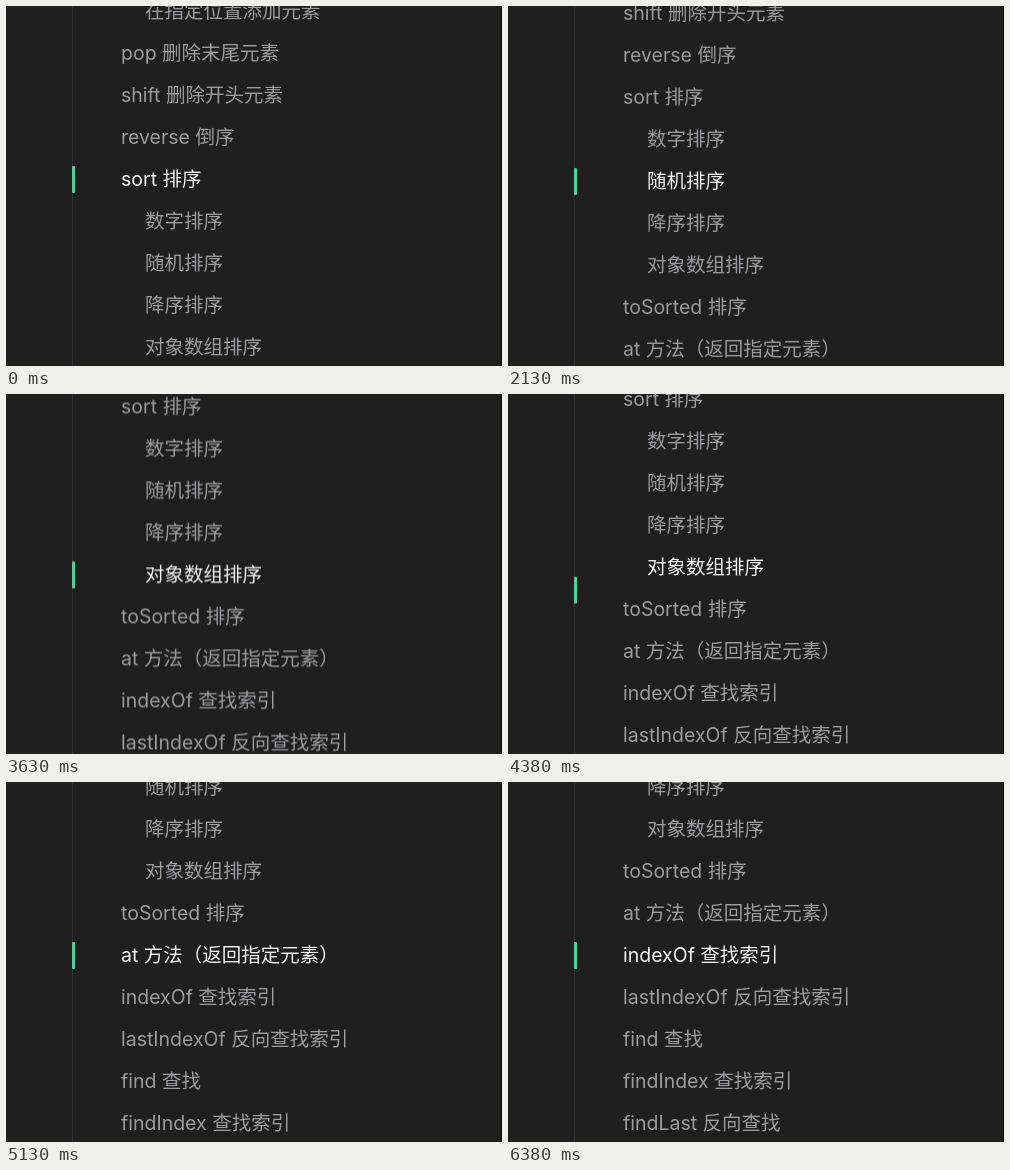
Recreate the animation shown at these times as an HTML page. Size 496 px wide and 360 px high, loop 8.04 s.

```html
<!DOCTYPE html>
<html lang="zh-CN">
<head>
<meta charset="utf-8">
<title>Outline</title>
<style>
  html, body { margin: 0; width: 100%; height: 100%; overflow: hidden; background: #1f1f20; }
  .stage { position: relative; width: 496px; height: 360px; overflow: hidden; }
  .rule, .edge { position: absolute; top: 0; width: 1px; height: 360px; }
  .rule { left: 66px; background: #303032; }
  .edge { left: 495px; background: #080808; }
  .list { position: absolute; left: 0; top: 0; width: 496px; animation: scroll 8040ms infinite; }
  .list a {
    position: absolute; left: 115px; height: 42px;
    font: 400 19.5px/42px Inter, "Noto Sans CJK SC", "Noto Sans CJK", sans-serif;
    font-optical-sizing: none; white-space: nowrap; color: rgb(156, 156, 158);
  }
  .list a.sub { left: 139px; }
  .marker {
    position: absolute; left: 66px; top: -8px; width: 3px; height: 27px;
    border-radius: 1px; background: #5fc99b; animation: marker 8040ms infinite;
  }
</style>
</head>
<body>
<div class="stage">
  <div class="rule"></div>
  <div class="list"><div class="marker"></div></div>
  <div class="edge"></div>
</div>
<script>
  const LOOP = 8040, PITCH = 42;
  const titles = [
    '>在指定位置添加元素', 'pop 删除末尾元素', 'shift 删除开头元素', 'reverse 倒序',
    'sort 排序', '>数字排序', '>随机排序', '>降序排序', '>对象数组排序',
    'toSorted 排序', 'at 方法（返回指定元素）', 'indexOf 查找索引',
    'lastIndexOf 反向查找索引', 'find 查找', 'findIndex 查找索引', 'findLast 反向查找'
  ];
  // Time at which each heading, from "sort" onwards, becomes active.
  const first = 4;
  const starts = [0, 745, 1535, 2915, 3085, 4375, 4460, 5705];
  const SNAP = 'cubic-bezier(0, 1, .5, 1)';

  const shiftY = y => `transform: translateY(${y}px)`;
  const tint = k => {
    const mix = (a, b) => Math.round(a + (b - a) * k);
    return `color: rgb(${mix(156, 242)}, ${mix(156, 242)}, ${mix(158, 240)})`;
  };

  // moves: [start, duration, value]; the value holds between moves.
  function keyframes(name, style, value, moves, ease) {
    const at = (t, v, e) =>
      `${(t / LOOP * 100).toFixed(4)}% { ${style(v)}; animation-timing-function: ${e} }`;
    const rows = [at(0, value, 'linear')];
    for (const [t, span, next] of moves) {
      rows.push(at(t, value, ease), at(t + span, next, 'linear'));
      value = next;
    }
    rows.push(at(LOOP, value, 'linear'));
    return `@keyframes ${name} { ${rows.join(' ')} }`;
  }

  const list = document.querySelector('.list');
  const rules = [
    keyframes('scroll', shiftY, 0,
      [[1974, 195, -84], [3509, 190, -168], [4914, 190, -252], [6203, 175, -294]], 'ease'),
    keyframes('marker', shiftY, first * PITCH, starts.slice(1).map((t, i) => {
      const gap = (starts[i + 2] ?? LOOP) - t;
      return [t, Math.min(250, gap - 1), (first + i + 1) * PITCH];
    }), SNAP)
  ];

  titles.forEach((title, i) => {
    const link = document.createElement('a');
    const sub = title[0] === '>';
    link.textContent = sub ? title.slice(1) : title;
    link.className = sub ? 'sub' : '';
    link.style.top = i * PITCH - 16 + 'px';
    list.append(link);

    const n = i - first;
    if (!(n in starts)) return;
    const on = starts[n], off = starts[n + 1];
    const moves = [];
    // A heading passed quickly lights only partly and fades back sooner.
    const lit = off - on < 100 ? .3 : off - on < 200 ? .6 : 1;
    if (n) moves.push([on, Math.min(500, off ? off - on - 1 : 500), lit]);
    if (off) moves.push([off, 500 * lit, 0]);
    rules.push(keyframes('tint' + i, tint, n ? 0 : 1, moves, 'ease'));
    link.style.animation = `tint${i} ${LOOP}ms infinite`;
  });

  const sheet = document.createElement('style');
  sheet.textContent = rules.join('\n');
  document.head.append(sheet);
</script>
</body>
</html>
```
